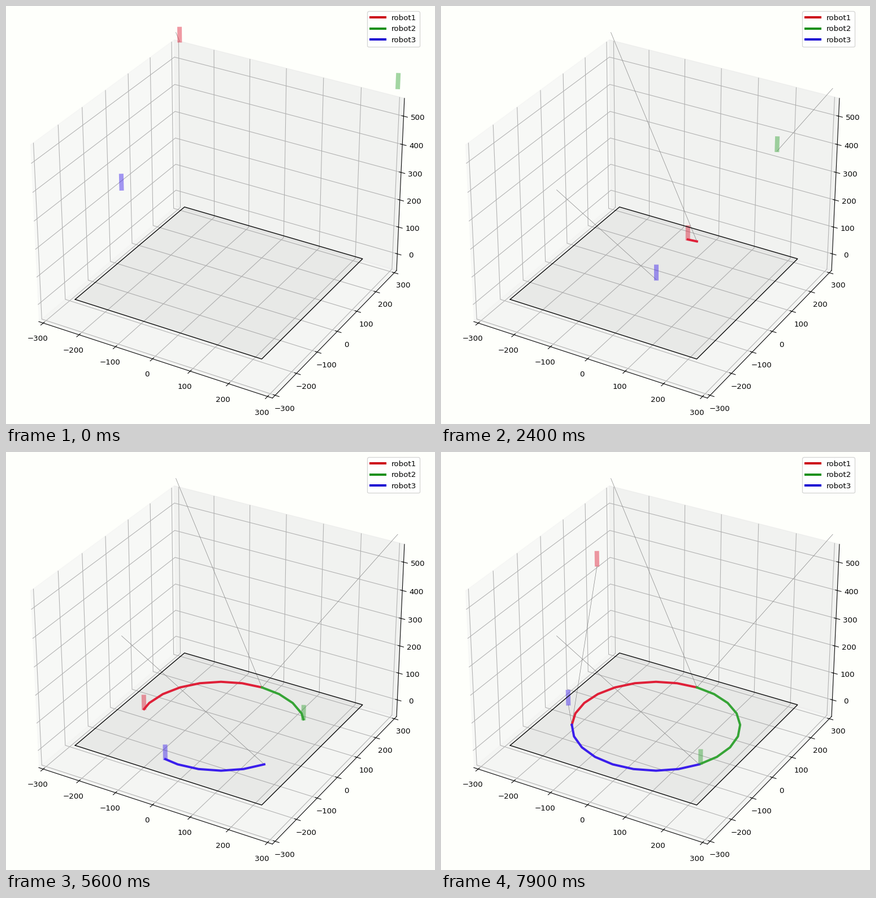
Write a matplotlib script that moves like this. It is 759x738 px and loops after 8 s.

```python
import numpy as np
import matplotlib.pyplot as plt
from matplotlib.animation import FuncAnimation
from matplotlib.lines import Line2D
from mpl_toolkits.mplot3d.art3d import Poly3DCollection

WIDTH, HEIGHT, DPI = 759, 738, 96
FRAMES, INTERVAL = 80, 100
SIDE, LEFT, TOP = 736, 2.4, 2.7       # square axes, in pixels
RADIUS = 200
TRAVEL, DRAW = 30, 10                 # units per frame
BACKGROUND = "#fefffb"

plt.rcParams["font.family"] = "DejaVu Sans"


class Robot:
    """Flies from home to an arc, draws it, and flies home again."""

    def __init__(self, ax, home, first, last, start, color):
        angles = np.radians(np.linspace(first, last, 9))
        arc = np.column_stack([RADIUS * np.cos(angles),
                               RADIUS * np.sin(angles), 0 * angles])
        self.points = np.vstack([home, arc, home])
        lengths = np.linalg.norm(np.diff(self.points, axis=0), axis=1)
        speeds = np.array([TRAVEL] + [DRAW] * 8 + [TRAVEL])
        self.times = start + np.append(0, np.cumsum(lengths / speeds))

        thin = dict(color="0.5", lw=0.5, zorder=2)
        self.trails = [
            (ax.plot([], [], [], **thin)[0], 0, 1),
            (ax.plot([], [], [], color=color, lw=3, zorder=3)[0], 1, 9),
            (ax.plot([], [], [], **thin)[0], 9, 10),
        ]
        self.body, = ax.plot([], [], [], color=color, lw=6, alpha=0.45,
                             solid_capstyle="projecting", zorder=4)

    def position(self, t):
        return np.array([np.interp(t, self.times, c) for c in self.points.T])

    def update(self, t):
        tip = self.position(t)
        for line, a, b in self.trails:
            if t <= self.times[a]:
                line.set_data_3d([], [], [])
                continue
            passed = self.points[a:b + 1][self.times[a:b + 1] <= t]
            if t < self.times[b]:
                passed = np.vstack([passed, tip])
            line.set_data_3d(*passed.T)
        x, y, z = tip
        self.body.set_data_3d([x, x], [y, y], [z + 5, z + 45])


fig = plt.figure(figsize=(WIDTH / DPI, HEIGHT / DPI), dpi=DPI,
                 facecolor=BACKGROUND)
ax = fig.add_axes([LEFT / WIDTH, 1 - (TOP + SIDE) / HEIGHT,
                   SIDE / WIDTH, SIDE / HEIGHT],
                  projection="3d", computed_zorder=False)
ax.set_facecolor(BACKGROUND)
ax.view_init(elev=30, azim=-60)
ax.set_xlim(-312.5, 312.5)
ax.set_ylim(-312.5, 312.5)
ax.set_zlim(-62.5, 562.5)
ax.set_xticks(range(-300, 301, 100))
ax.set_yticks(range(-300, 301, 100))
ax.set_zticks(range(0, 501, 100))

# Drawing sheet
corners = [(-250, -250, 0), (250, -250, 0), (250, 250, 0), (-250, 250, 0)]
ax.add_collection3d(Poly3DCollection([corners], facecolors=(0.5, 0.5, 0.5, 0.1),
                                     edgecolors="none", zorder=1))
ax.plot(*zip(*corners, corners[0]), color="black", lw=1, zorder=5)

far = 300 * np.sqrt(2)
robots = [
    Robot(ax, (-300, 300, 600), 90, 210, -1, "#df2038"),
    Robot(ax, (300, 300, 600), 90, -30, 15, "#36a436"),
    Robot(ax, (0, -far, 600), -30, -150, 8, "#3a1eec"),
]

legend_colors = ["#cc0011", "#189018", "#1400d2"]
ax.legend([Line2D([], [], color=c, lw=3) for c in legend_colors],
          ["robot1", "robot2", "robot3"], loc="upper right")


def update(frame):
    for robot in robots:
        robot.update(frame)
    return []


animation = FuncAnimation(fig, update, frames=FRAMES, interval=INTERVAL,
                          repeat=True, blit=False)
plt.show()
```
